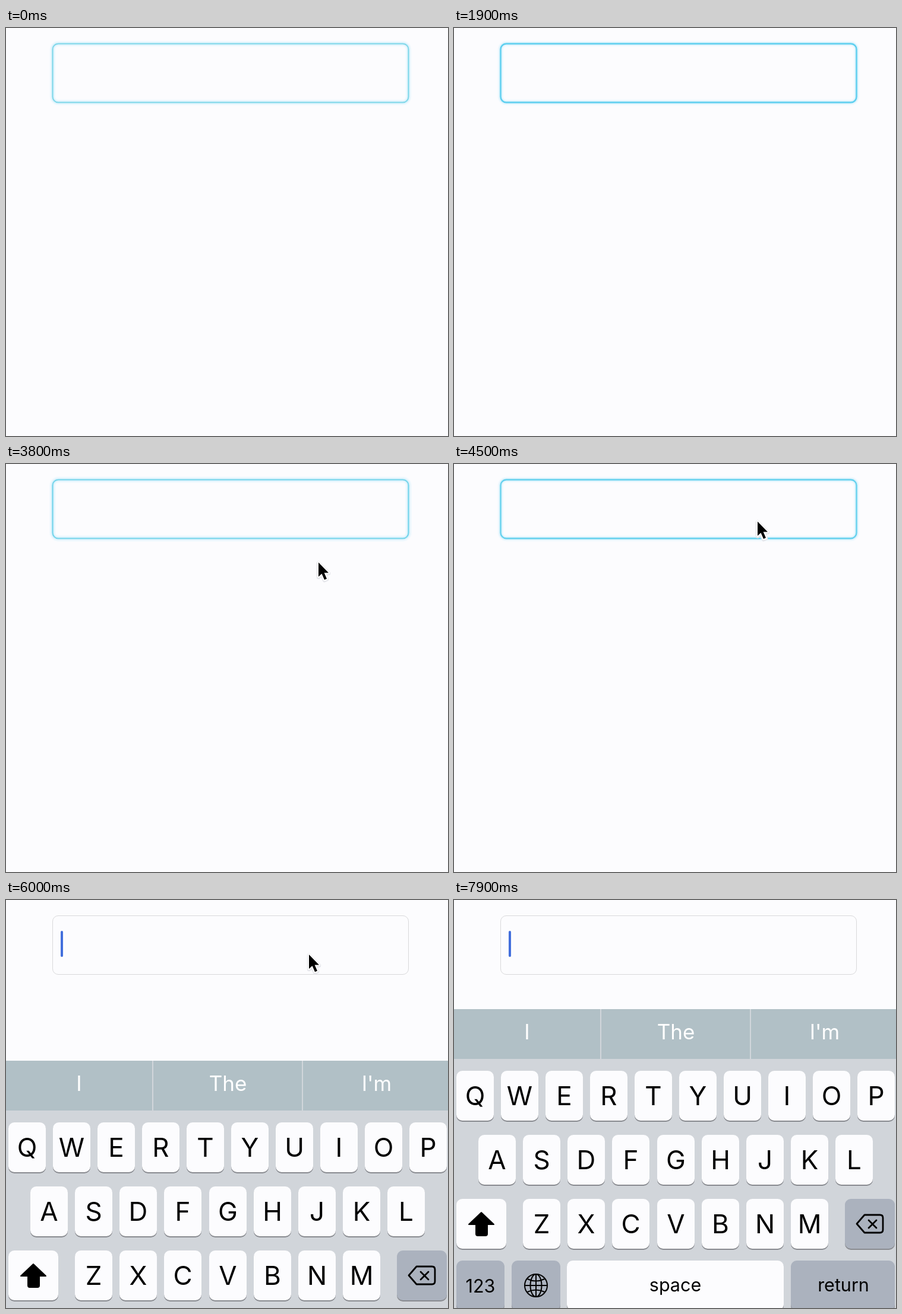
Animation, 744 px wide and 688 px high, one loop 8000 ms. Source, as an HTML page:

```html
<!DOCTYPE html>
<html lang="en">
<head>
<meta charset="utf-8">
<title>Text field and keyboard</title>
<style>
html, body { margin: 0; width: 100%; height: 100%; overflow: hidden; background: #fcfcfe; }
svg { display: block; width: 744px; height: 688px; }
text { font-family: Inter, Roboto, sans-serif; text-anchor: middle; }
</style>
</head>
<body>
<svg viewBox="0 0 744 688">
  <g id="halo" fill="none" stroke="#51cbee"></g>
  <rect id="field" x="78.5" y="26.5" width="599" height="99" rx="9.5" fill="none"/>
  <rect id="caret" x="92" y="52" width="4" height="44" rx="2" fill="#426fdc"/>
  <g id="board"></g>
  <g id="pointer" stroke-linejoin="round">
    <path d="M0 0V24L5.5 19L10 29.3L14 27.6L9.6 17.5H17Z" transform="translate(0 1)" fill="none" stroke="#e6e7ec" stroke-width="6.5"/>
    <path d="M0 0V24L5.5 19L10 29.3L14 27.6L9.6 17.5H17Z" fill="#000" stroke="#fff" stroke-width="4" paint-order="stroke"/>
  </g>
</svg>
<script>
const LOOP = 8000, STEP = 100, PULSE = 2400, CLICK = 5500, OPEN = 5700;
const REST = 184, HIDDEN = 688, PITCH = 75.06;
const $ = id => document.getElementById(id);
const clamp = x => Math.max(0, Math.min(1, x));

function add(parent, tag, attrs, label) {
  const el = document.createElementNS("http://www.w3.org/2000/svg", tag);
  for (const k in attrs) el.setAttribute(k, attrs[k]);
  if (label) el.textContent = label;
  parent.appendChild(el);
  return el;
}

const board = $("board");

function label(str, x, y, size, fill = "#000") {
  add(board, "text", { x, y, "font-size": size, fill }, str);
}

function key(x, y, width, fill = "#fcfcfe") {
  add(board, "rect", { x, y: y + 2, width, height: 84, rx: 10, fill: "#898b90" });
  add(board, "rect", { x, y, width, height: 84, rx: 10, fill });
}

function letters(str, x, y) {
  [...str].forEach((c, i) => {
    const left = Math.round(x + i * PITCH);
    key(left, y, 63);
    label(c, left + 31.5, y + 58, 44);
  });
}

function line(d, width) {
  add(board, "path", { d, fill: "none", stroke: "#000", "stroke-width": width,
    "stroke-linejoin": "round", "stroke-linecap": "round" });
}

function buildBoard() {
  const grey = "#abb2be";
  add(board, "rect", { width: 744, height: 520, fill: "#d1d5da" });
  add(board, "rect", { width: 744, height: 84, fill: "#b1c0c6" });
  for (const x of [246, 498]) add(board, "rect", { x, width: 2, height: 84, fill: "#d1d6db" });
  label("I", 123, 51, 35, "#fff");
  label("The", 373.5, 51, 35, "#fff");
  label("I'm", 624, 51, 35, "#fff");

  letters("QWERTYUIOP", 3.9, 104);
  letters("ASDFGHJKL", 41.3, 212);
  letters("ZXCVBNM", 116.36, 320);

  key(4, 320, 84);
  add(board, "path", { d: "M46 343L67 363H56V379Q56 382 53 382H40Q37 382 37 379V363H25Z",
    stroke: "#000", "stroke-width": 2, "stroke-linejoin": "round" });
  key(658, 320, 84, grey);
  line("M691 347H717Q722 347 722 352V372Q722 377 717 377H691L678 362Z", 2.8);
  line("M698 356L711 369M711 356L698 369", 2.8);

  key(4, 424, 81, grey);
  key(97, 424, 82, grey);
  key(190, 424, 365);
  key(567, 424, 175, grey);
  label("123", 44.5, 478, 30.5);
  label("space", 372.5, 476, 30.5);
  label("return", 655.5, 476, 30.5);
  for (const rx of [19, 9.5])
    add(board, "ellipse", { cx: 138, cy: 466, rx, ry: 19, fill: "none", stroke: "#000", "stroke-width": 2 });
  line("M138 447V485M119 466H157M123.5 455Q138 462 152.5 455M123.5 477Q138 470 152.5 477", 2);
}

const rings = [1, 2, 3].map(() =>
  add($("halo"), "rect", { x: 78.5, y: 26.5, width: 599, height: 99, rx: 9.5 }));

// Mix along rows of [position, ...values]
function along(rows, x) {
  let i = 1;
  while (i < rows.length - 1 && rows[i][0] < x) i++;
  const a = rows[i - 1], b = rows[i];
  const p = clamp((x - a[0]) / (b[0] - a[0]));
  return a.slice(1).map((v, k) => v + (b[k + 1] - v) * p);
}

const tints = [[0, 214, 220, 224], [0.25, 135, 215, 222], [1, 81, 203, 238]];

function drawField(t) {
  const a = 2 * Math.PI * (t - 650) / PULSE;
  const level = t < CLICK ? 0.5 - 0.5 * Math.cos(a) : 0;
  const rising = Math.sin(a) > 0;
  const seen = clamp((level - 0.045) / 0.05);
  const reach = 5 + (rising ? 5 * (1 - level) ** 2 : 0);
  const field = $("field");
  const rgb = t < CLICK ? along(tints, level) : [217, 217, 219];
  field.setAttribute("stroke", `rgb(${rgb.map(Math.round)})`);
  field.setAttribute("stroke-width", 1 + 0.9 * level);
  const widths = [2 * reach, 1.5 * reach, 4.5];
  const alphas = [0.04, 0.06, 0.06 + 0.2 * level];
  rings.forEach((r, i) => {
    r.setAttribute("stroke-width", widths[i]);
    r.setAttribute("opacity", alphas[i] * seen);
  });
}

const track = [
  [2500, 720, 454], [2600, 697, 430], [2700, 667, 399], [2800, 640, 366],
  [3200, 580, 284], [3600, 536, 210], [3800, 526, 166],
  [4100, 516, 124], [4500, 511, 97], [4800, 510, 92]
];

function drawPointer(t) {
  const [x, y] = along(track, t).map(Math.round);
  $("pointer").setAttribute("transform", `translate(${x} ${y})`);
  $("pointer").setAttribute("visibility", t >= 2500 && t < 7000 ? "visible" : "hidden");
}

function drawBoard(t) {
  const s = Math.max(0, t - OPEN) / 1000 * 10.65;
  const y = Math.round(REST + (HIDDEN - REST) * (1 + s) * Math.exp(-s));
  board.setAttribute("transform", `translate(0 ${y})`);
  const lit = t >= 5800 && (t - 5800) % 1000 < 500;
  $("caret").setAttribute("visibility", lit ? "visible" : "hidden");
}

function draw(ms) {
  const t = Math.floor(ms % LOOP / STEP) * STEP;
  drawField(t);
  drawPointer(t);
  drawBoard(t);
}

buildBoard();
draw(0);
const start = performance.now();
function tick() {
  draw(performance.now() - start);
  requestAnimationFrame(tick);
}
requestAnimationFrame(tick);
</script>
</body>
</html>
```
